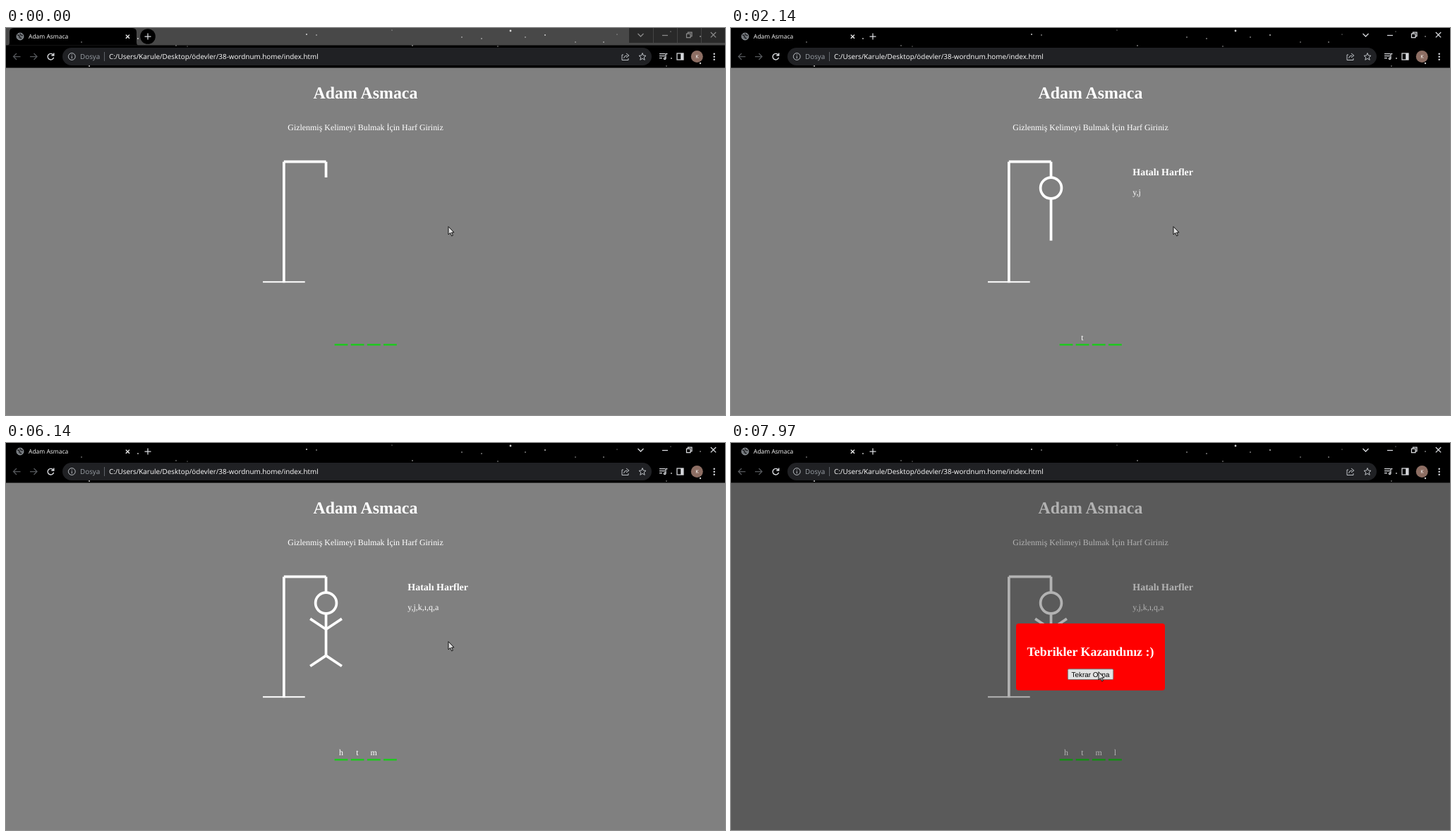
An HTML page that plays this animation: 1019x549 px, repeating every 8 s.

```html
<!DOCTYPE html>
<html lang="tr">
<head>
<meta charset="utf-8">
<title>Adam Asmaca</title>
<style>
  html, body { margin: 0; width: 100%; height: 100%; overflow: hidden; background: #808080; }
  svg { display: block; width: 100%; height: 100%; }
  text { white-space: pre; text-rendering: geometricPrecision; }
  .ui { font-family: "Open Sans", sans-serif; fill: #fff; }
  .page { font-family: "Liberation Serif", serif; font-size: 11.94px; fill: #fff; }
  .mid { text-anchor: middle; }
  .bold { font-weight: 700; }
  .line { fill: none; stroke: #dadce0; stroke-width: 1.25; }
  .off { stroke: #55585c; }
  .dim { stroke: #8a8a8a; }
  .figure { fill: none; stroke: #fff; stroke-width: 5; }
</style>
</head>
<body>
<svg viewBox="0 0 1019 549">
  <rect width="1019" height="549" fill="#808080"/>

  <!-- browser chrome -->
  <rect width="1019" height="56.5" fill="#000"/>
  <g data-until="70">
    <rect width="1019" height="24.5" fill="#484848"/>
    <path d="M2 24.5Q5 24.5 5 20V6Q5 0 11 0H179Q185 0 185 6V20Q185 24.5 188 24.5Z"/>
    <circle cx="201" cy="12" r="10.8"/>
    <path d="M883 0H1019V21H883Z" fill="#292929"/>
    <path d="M917.5 0V21M951.5 0V21M985.5 0V21" stroke="#444"/>
  </g>
  <rect x="80" y="28" width="835" height="25" rx="12.5" fill="#202124"/>
  <g id="stars" fill="#fff"></g>

  <g fill="none" stroke="#9aa0a6">
    <circle cx="20" cy="12" r="4.9" fill="#6f7377"/>
    <path d="M16 10Q19 10 19 12T22 15M20 7.5Q20 11 24 10.5" stroke="#202124" stroke-width="1.4"/>
  </g>
  <text class="ui" x="32" y="15" font-size="8.5">Adam Asmaca</text>
  <g class="line">
    <path d="M169.8 9.6L175 14.8M175 9.6L169.8 14.8" stroke="#fff"/>
    <path d="M196.5 12H205.5M201 7.5V16.5"/>
    <path class="off" d="M20.500 40.500H10.500M15 36L10.500 40.500L15 45M34 40.500H44M39.500 36L44 40.500L39.500 45"/>
    <path d="M67 38.200A4.300 4.300 0 1 0 67.600 41.800M67.800 35.500V39H64.300" stroke-width="1.400"/>
    <g stroke="#bdc1c6" stroke-width="1">
      <circle cx="93.300" cy="40.500" r="4.900"/>
      <path d="M93.300 39.800V43.300M93.300 37.500V38.600"/>
      <path d="M139.500 34V47" stroke="#5f6368"/>
      <path d="M875 38H873V45.500H882V43M875.500 43Q876 39 880.500 39M879 36L883 39L879 42"/>
      <path d="M902 35.500L903.400 39L907 39.300L904.300 41.700L905.200 45.300L902 43.300L898.800 45.300L899.700 41.700L897 39.300L900.600 39Z"/>
    </g>
    <path d="M926 36.500H934M926 39.500H934M926 42.500H930M935 43V36.500H937.500"/>
    <circle cx="933.700" cy="43.300" r="1.300"/>
    <rect x="951" y="36" width="9" height="9"/>
    <path d="M958 36V45" stroke-width="3.500"/>
  </g>
  <g id="window-buttons" class="line" stroke-width="1">
    <path d="M895.500 8L899.500 12L903.500 8"/>
    <path d="M930 10.500H938" stroke="inherit"/>
    <path d="M964.500 8H970V13.500H964.500ZM966.500 8V6H972V11.500H970"/>
    <path d="M998.800 6L1006.200 13.400M1006.200 6L998.800 13.400"/>
  </g>
  <text class="ui" x="105" y="44.200" font-size="9.900" style="fill:#9aa0a6">Dosya</text>
  <text class="ui" x="146" y="44.200" font-size="9.900">C:/Users/Karule/Desktop/ödevler/38-wordnum.home/index.html</text>
  <circle cx="979.300" cy="40.500" r="8.500" fill="#8d6e63"/>
  <text class="ui mid" x="979.300" y="43" font-size="7">K</text>
  <g fill="#dadce0">
    <circle cx="1003.700" cy="36.700" r="1.200"/>
    <circle cx="1003.700" cy="40.700" r="1.200"/>
    <circle cx="1003.700" cy="44.700" r="1.200"/>
  </g>

  <!-- game -->
  <g class="page">
    <text class="mid bold" x="509.500" y="100.300" font-size="23.870">Adam Asmaca</text>
    <text class="mid" x="509.500" y="145">Gizlenmiş Kelimeyi Bulmak İçin Harf Giriniz</text>
    <text class="bold" x="569.300" y="209.300" font-size="13.970" data-from="930">Hatalı Harfler</text>
    <text id="misses" x="569.300" y="237.300"></text>
  </g>
  <g class="figure" transform="translate(349.100 174.800) scale(.746)">
    <path d="M60 20H140M140 20V50M60 20V250"/>
    <path d="M20 248.700H100" stroke-width="2.600"/>
    <circle cx="140" cy="70" r="20" data-from="930"/>
    <path d="M140 90V170" data-from="2140"/>
    <path d="M140 120L110 100" data-from="2410"/>
    <path d="M140 120L170 100" data-from="2810"/>
    <path d="M140 170L110 190" data-from="3540"/>
    <path d="M140 170L170 190" data-from="3740"/>
  </g>
  <g id="word" class="page mid" font-size="23.870"></g>

  <!-- result -->
  <g data-from="6410">
    <rect y="56.500" width="1019" height="492.500" fill="#000" fill-opacity=".3"/>
    <rect x="404" y="256" width="211" height="95" rx="4" fill="#f00"/>
    <text class="page mid bold" x="509.500" y="302" style="font-size:17.900px">Tebrikler Kazandınız :)</text>
    <rect id="again" x="477.300" y="320.800" width="64.500" height="14.800" rx="1.500" fill="#efefef" stroke="#767676"/>
    <text class="mid" x="509.500" y="331.700" font-family="Liberation Sans, sans-serif" font-size="9.900">Tekrar Oyna</text>
  </g>
  <path id="cursor" d="M0 .7V12L2.700 9.600L4.600 14L6.400 13.200L4.500 9H8Z" fill="#e0e0e0" stroke="#000" stroke-width=".9"/>
</svg>
<script>
const LOOP = 8000;
const SVG = "http://www.w3.org/2000/svg";
const $ = id => document.getElementById(id);

function add(parent, tag, attrs, content = "") {
  const node = document.createElementNS(SVG, tag);
  for (const key in attrs) node.setAttribute(key, attrs[key]);
  node.textContent = content;
  parent.append(node);
}

// x, y, radius
const stars = [
  [107, 20, .7], [187, 15, .9], [241, 25, .7], [257, 26, .6], [118, 54, 1],
  [426, 9, 1], [440, 10, .8], [547, 3, .6], [576, 25, .8], [646, 13, .8],
  [674, 15, .8], [697, 26, .7], [715, 4, 1.4], [736, 13, .8], [764, 10, .9],
  [807, 20, .7], [847, 20, .8], [866, 9, .6], [936, 54, .7], [943, 43, .9],
  [942, 5, .6], [984, 12, .8], [984, 50, 1.2]
];
for (const [cx, cy, r] of stars) add($("stars"), "circle", { cx, cy, r, opacity: .8 });

[["h", 5210], ["t", 660], ["m", 6140], ["l", 6410]].forEach(([letter, from], i) => {
  const x = 465.6 + i * 23.13;
  add($("word"), "rect", { x, y: 448, width: 18.8, height: 2.6, fill: "#22c522" });
  add($("word"), "text", { x: x + 9.3, y: 443, "data-from": from }, letter);
});

const misses = [["y", 930], ["j", 2140], ["k", 2410], ["ı", 2810], ["q", 3540], ["a", 3740]];
const timed = [...document.querySelectorAll("[data-from], [data-until]")];

function cursorAt(t) {
  const step = Math.max(0, Math.min(11, Math.floor((t - 7270) / 70) + 1));
  const p = step / 11;
  const ease = p * p * (3 - 2 * p);
  return [627 - 106 * ease, 281 + 43 * ease];
}

function draw(t) {
  for (const node of timed) {
    const { from = 0, until = LOOP } = node.dataset;
    node.style.display = t >= +from && t < +until ? "" : "none";
  }
  $("misses").textContent = misses.filter(([, at]) => t >= at).map(([letter]) => letter).join(",");
  $("window-buttons").classList.toggle("dim", t < 70);

  const [x, y] = cursorAt(t);
  $("cursor").setAttribute("transform", `translate(${x} ${y})`);
  const hover = x > 477 && x < 542 && y > 320.500 && y < 336;
  $("again").setAttribute("fill", hover ? "#e2e2e2" : "#efefef");
}

const start = performance.now();
function tick() {
  draw((performance.now() - start) % LOOP);
  requestAnimationFrame(tick);
}
tick();
</script>
</body>
</html>
```
